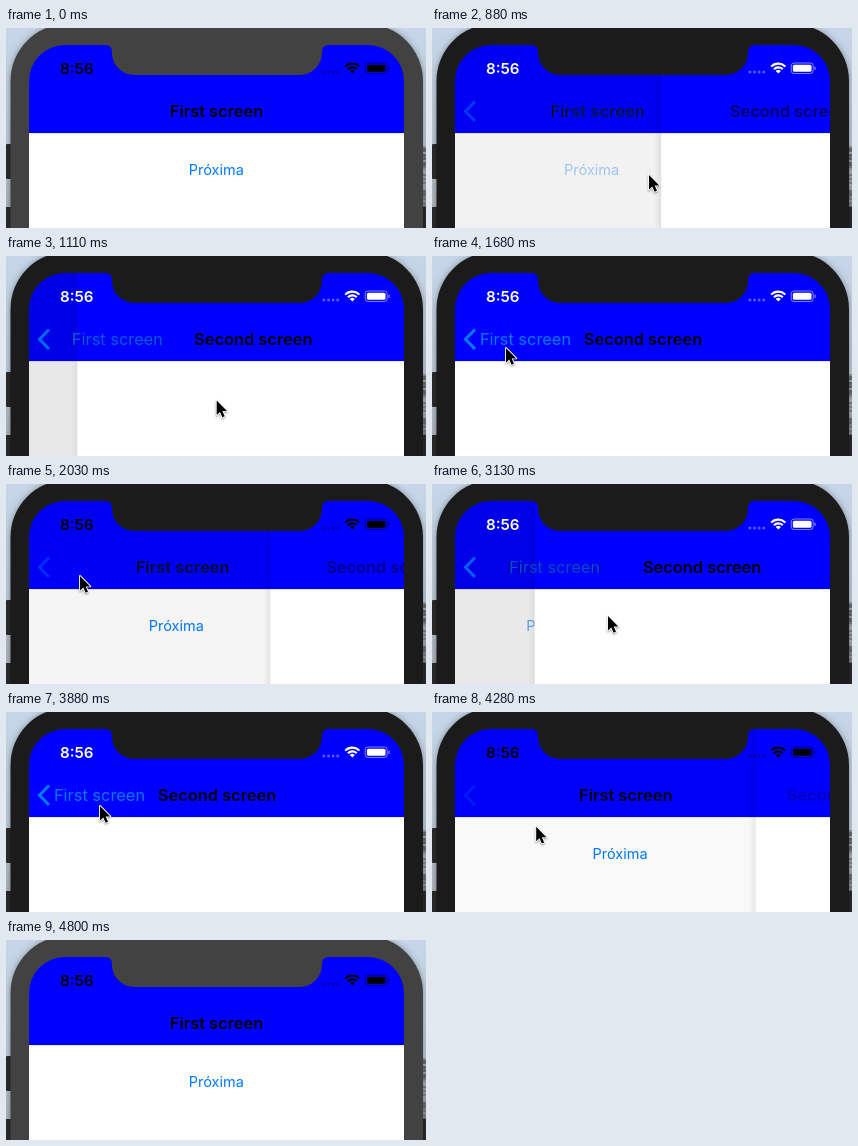
Write an HTML page with a canvas that moves like this. It is 420 px wide and 200 px high and loops after 4900 ms.

```html
<!DOCTYPE html>
<html lang="pt">
<head>
<meta charset="utf-8">
<style>
  html, body { margin: 0; width: 100%; height: 100%; overflow: hidden; }
  canvas { display: block; }
</style>
</head>
<body>
<canvas id="stage" width="420" height="200"></canvas>
<script>
const ctx = document.getElementById('stage').getContext('2d');
const LOOP = 4900, LEFT = 23, WIDTH = 375, BAR_BOTTOM = 105;
const BAR = '#0000ff', TINT = '#007aff';

// Each transition appears at `from` and settles at `end`.
const transitions = [
  { from: 820, end: 1415, to: 1 },
  { from: 1910, end: 2482, to: 0 },
  { from: 3010, end: 3500, to: 1 },
  { from: 4110, end: 4640, to: 0 },
];
const SETTLE = 674;

// Pointer stops: time, x, y
const pointerPath = [
  [300, 235, 196], [640, 217, 147], [1040, 217, 147], [1600, 74, 92],
  [2060, 74, 92], [2500, 178, 139], [2540, 183, 140], [2600, 185, 141],
  [2660, 186, 141], [2980, 186, 141], [3130, 176, 132], [3480, 117, 101],
  [3880, 94, 94], [4160, 94, 94], [4600, 149, 206],
];

const clamp = v => Math.max(0, Math.min(1, v));
const mix = (a, b, k) => a + (b - a) * k;
const smooth = k => k * k * (3 - 2 * k);
const between = (t, a, b) => t >= a && t < b;

// 0 is the first screen, 1 the second.
function screenAt(t) {
  const move = transitions.findLast(m => t >= m.from);
  if (!move) return 0;
  const rest = clamp((move.end - t) / SETTLE) ** 2.57;
  return move.to ? 1 - rest : rest;
}

function buttonAlpha(t) {
  for (const [down, up] of [[700, 800], [2840, 2980]]) {
    if (between(t, down, up)) return 0.2;
    if (between(t, up, up + 300)) return mix(0.2, 1, smooth((t - up) / 300));
  }
  return 1;
}

function box(color, x, y, w, h, r = 0) {
  ctx.fillStyle = color;
  ctx.beginPath();
  ctx.roundRect(x, y, w, h, r);
  ctx.fill();
}

function text(str, x, y, size, weight, color, alpha = 1, align = 'left') {
  ctx.globalAlpha = clamp(alpha);
  ctx.font = `${weight} ${size}px Inter, sans-serif`;
  ctx.textAlign = align;
  ctx.fillStyle = color;
  ctx.fillText(str, x, y);
  ctx.globalAlpha = 1;
}

function drawDesktop() {
  const sky = ctx.createLinearGradient(0, 0, 0, 200);
  sky.addColorStop(0, '#c6d6e8');
  sky.addColorStop(0.55, '#bccad8');
  sky.addColorStop(1, '#aaacb2');
  box(sky, 0, 0, 420, 200);
  for (let y = 118; y < 179; y += 2) {
    const tone = 135 + 35 * Math.sin(y * y);
    box(`rgb(${tone},${tone + 4},${tone + 8})`, 416, y, 4, 2);
  }
  box('#2b2b2b', 0, 116, 6, 35, 1);
  box('#2b2b2b', 0, 179, 6, 21);
  box('#2b2b2b', 416, 179, 4, 21);
}

function drawBody(color) {
  ctx.save();
  ctx.shadowColor = 'rgba(0,0,0,0.35)';
  ctx.shadowBlur = 6;
  box(color, 4.5, -4, 412.5, 260, 57);
  ctx.restore();
}

function drawScreens(p) {
  const edge = LEFT + WIDTH * (1 - p);
  box(BAR, LEFT, 17, WIDTH, BAR_BOTTOM - 17);
  box('#fff', LEFT, BAR_BOTTOM, WIDTH, 200 - BAR_BOTTOM);
  box('rgba(0,0,0,0.2)', LEFT, BAR_BOTTOM, WIDTH, 0.5);

  ctx.save();
  ctx.beginPath();
  ctx.rect(LEFT, BAR_BOTTOM, edge - LEFT, 95);
  ctx.clip();
  text('Próxima', 210.3 - 0.3 * WIDTH * p, 147, 14.5, 400, TINT, buttonAlpha(now), 'center');
  ctx.restore();

  if (p <= 0 || p >= 1) return;
  box(`rgba(0,0,0,${0.11 * p})`, LEFT, 17, edge - LEFT, 183);
  const shade = ctx.createLinearGradient(edge - 7, 0, edge, 0);
  shade.addColorStop(0, 'rgba(0,0,0,0)');
  shade.addColorStop(1, `rgba(0,0,0,${0.08 * Math.min(1, 3 * (1 - p))})`);
  box(shade, edge - 7, 17, 7, 183);
}

function drawTitles(p, backAlpha) {
  const q = p ** 1.2, fade = p * p;
  const center = mix(210.5, 93.5, q);
  text('First screen', center, 89, 16.4, 600, '#000', 1 - fade, 'center');
  text('First screen', center, 89, 16.4, 400, TINT, fade * backAlpha, 'center');
  text('Second screen', mix(448, 211, q), 89, 16.4, 600, '#000', 1.3 * p, 'center');

  ctx.globalAlpha = p * backAlpha;
  ctx.strokeStyle = TINT;
  ctx.lineWidth = 3;
  ctx.beginPath();
  ctx.moveTo(43, 73.5);
  ctx.lineTo(33.5, 83.2);
  ctx.lineTo(43, 93);
  ctx.stroke();
  ctx.globalAlpha = 1;
}

function drawStatus(color) {
  text('8:56', 54, 45.5, 15.2, 600, color);
  ctx.globalAlpha = 0.35;
  for (let i = 0; i < 4; i++) box(color, 316.4 + i * 4.6, 42.5, 3, 3, 1.5);
  ctx.globalAlpha = 1;

  // Wi-Fi: a wedge and two arcs
  ctx.strokeStyle = color;
  for (const [r, w] of [[1.8, 3.6], [6.1, 2.1], [9.9, 2.1]]) {
    ctx.lineWidth = w;
    ctx.beginPath();
    ctx.arc(346.3, 45.5, r, -Math.PI * 0.755, -Math.PI * 0.245);
    ctx.stroke();
  }

  ctx.globalAlpha = 0.5;
  ctx.lineWidth = 1;
  ctx.beginPath();
  ctx.roundRect(359.2, 35, 22, 10.5, 2.8);
  ctx.stroke();
  box(color, 382.4, 38.5, 1.3, 3.6, 1);
  ctx.globalAlpha = 1;
  box(color, 360.9, 36.7, 18.6, 7.1, 1.5);
}

function drawNotch(color) {
  ctx.fillStyle = color;
  ctx.beginPath();
  ctx.moveTo(99, 16);
  ctx.lineTo(99, 17);
  ctx.quadraticCurveTo(106, 17, 106, 24);
  ctx.arcTo(106, 47, 128, 47, 22);
  ctx.arcTo(316, 47, 316, 24, 22);
  ctx.lineTo(316, 24);
  ctx.quadraticCurveTo(316, 17, 323, 17);
  ctx.lineTo(323, 16);
  ctx.fill();
}

function drawPointer(t) {
  const i = pointerPath.findIndex(stop => stop[0] > t);
  if (i < 1) return;
  const [t0, x0, y0] = pointerPath[i - 1], [t1, x1, y1] = pointerPath[i];
  const k = smooth((t - t0) / (t1 - t0));
  ctx.save();
  ctx.translate(mix(x0, x1, k), mix(y0, y1, k));
  const arrow = new Path2D('M0 0V14.5L3.3 11.4L5.6 16.7L8 15.7L5.7 10.4H10.3Z');
  ctx.lineWidth = 1.8;
  ctx.lineJoin = 'round';
  ctx.strokeStyle = '#fff';
  ctx.shadowColor = 'rgba(0,0,0,0.4)';
  ctx.shadowBlur = 2;
  ctx.shadowOffsetY = 1;
  ctx.stroke(arrow);
  ctx.shadowColor = 'transparent';
  ctx.fillStyle = '#000';
  ctx.fill(arrow);
  ctx.restore();
}

let now = 0;

function frame() {
  now = performance.now() % LOOP;
  const p = screenAt(now);
  const focused = between(now, 300, 4800);
  const body = focused ? '#1b1b1b' : '#424242';
  const onSecond = between(now, 820, 1910) || between(now, 3010, 4110);
  const backPressed = between(now, 1800, 1910) || between(now, 3990, 4110);

  drawDesktop();
  drawBody(body);
  ctx.save();
  ctx.beginPath();
  ctx.roundRect(LEFT, 17, WIDTH, 240, 36);
  ctx.clip();
  drawScreens(p);
  drawTitles(p, backPressed ? 0.25 : 1);
  drawStatus(onSecond ? '#fff' : '#000');
  ctx.restore();
  drawNotch(body);
  drawPointer(now);
  requestAnimationFrame(frame);
}
requestAnimationFrame(frame);
</script>
</body>
</html>
```
